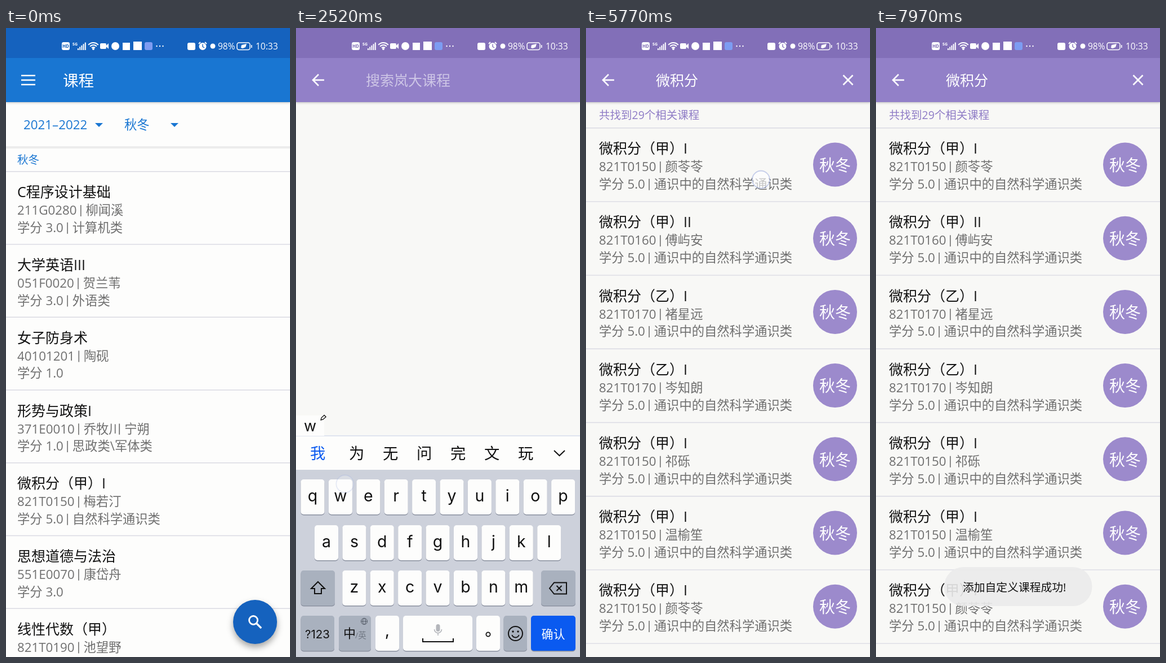
Recreate the animation shown at these times as an HTML page with a canvas. Size 504 px wide and 1112 px high, loop 8000 ms.

```html
<!DOCTYPE html>
<html lang="zh-CN">
<head>
<meta charset="utf-8">
<title>课程搜索</title>
<style>
html, body { margin: 0; width: 100%; height: 100%; overflow: hidden; }
canvas { display: block; }
</style>
</head>
<body>
<canvas id="stage" width="504" height="1112"></canvas>
<script>
const W = 504, H = 1112, LOOP = 8000;
const c = document.getElementById('stage').getContext('2d');
const FONT = "'Open Sans','Noto Sans CJK SC','Noto Sans CJK',sans-serif";
const KEY_FONT = "Inter,'Noto Sans CJK SC',sans-serif";
const INK = '#111', GRAY = '#6f6f6f', RULE = '#dadae3', PAPER = '#fdfdfc', WHITE = '#fff';
const BLUE = { bar: '#1976d2', status: '#1562be', fab: '#1562be' };
const PURPLE = { bar: '#9280c8', status: '#826fb8', fab: '#6d58a8' };
const ACCENT = '#0a5af0';

// ---------- drawing helpers ----------
const clamp = v => Math.max(0, Math.min(1, v));
const ease = (t, start, length) => 1 - (1 - clamp((t - start) / length)) ** 3;

function rect(x, y, w, h, color, r = 0) {
  c.fillStyle = color;
  c.beginPath();
  c.roundRect(x, y, w, h, r);
  c.fill();
}
function frame(x, y, w, h, r, color = INK, width = 2) {
  c.strokeStyle = color;
  c.lineWidth = width;
  c.beginPath();
  c.roundRect(x, y, w, h, r);
  c.stroke();
}
function disc(x, y, r, color) {
  c.fillStyle = color;
  c.beginPath();
  c.arc(x, y, r, 0, 7);
  c.fill();
}
function arc(x, y, r, color = INK, width = 2, from = 0, to = Math.PI * 2) {
  c.strokeStyle = color;
  c.lineWidth = width;
  c.beginPath();
  c.arc(x, y, r, from, to);
  c.stroke();
}
// points: x, y, x, y ...
function trace(points) {
  c.beginPath();
  for (let i = 0; i < points.length; i += 2) c.lineTo(points[i], points[i + 1]);
}
function line(points, color = INK, width = 2, closed = false) {
  trace(points);
  if (closed) c.closePath();
  c.strokeStyle = color;
  c.lineWidth = width;
  c.stroke();
}
function poly(points, color) {
  trace(points);
  c.fillStyle = color;
  c.fill();
}
function cross(x, y, r, color, width) {
  line([x - r, y - r, x + r, y + r], color, width);
  line([x - r, y + r, x + r, y - r], color, width);
}
// y is the visual middle of the text; returns the right edge
function text(s, x, y, size, color = INK, align = 'left', weight = 400, font = FONT) {
  c.font = `${weight} ${size}px ${font}`;
  c.textAlign = align;
  c.fillStyle = color;
  c.fillText(s, x, y + size * .37);
  return x + c.measureText(s).width;
}
const keyText = (s, x, y, size, align = 'center') => text(s, x, y, size, INK, align, 400, KEY_FONT);
const rule = (y, x = 0) => rect(x, y - .5, W - 2 * x, 1.4, RULE);

function shadowed(blur, dy, color, draw) {
  c.save();
  c.shadowBlur = blur;
  c.shadowOffsetY = dy;
  c.shadowColor = color;
  draw();
  c.restore();
}

// ---------- status bar ----------
function statusIcons(tint) {
  rect(99, 25, 14, 14, WHITE, 3);
  text('HD', 106, 32, 8, tint, 'center', 700);
  text('5G', 118, 28, 7, WHITE, 'left', 700);
  for (let i = 0; i < 5; i++) rect(127 + i * 3.2, 36 - i * 2.6, 2, 3 + i * 2.6, WHITE);
  for (const r of [4, 8, 12]) arc(155, 38, r, WHITE, 2, -2.4, -.75);
  disc(155, 37, 2, WHITE);
  rect(167, 27, 11, 10, WHITE, 2);
  poly([177, 32, 182, 27, 182, 37], WHITE);
  disc(194, 32, 7, WHITE);
  rect(207, 26, 13, 13, WHITE);
  rect(226, 24, 15, 15, WHITE);
  rect(246, 25, 14, 14, '#7d9cf2', 3);
  for (const x of [267.5, 273, 278.5]) disc(x, 32, 1.2, WHITE);

  rect(322, 26, 14, 13, WHITE, 3);
  disc(349, 32.5, 6.5, WHITE);
  line([349, 28.5, 349, 33, 352, 35], tint, 1.4);
  line([342, 28, 345, 25], WHITE);
  line([353, 25, 356, 28], WHITE);
  disc(367, 32, 4.5, WHITE);
  text('98%', 376, 32.5, 15.5, WHITE);
  frame(410, 26, 23, 12.5, 3.5, WHITE, 1.5);
  rect(435, 30, 1.6, 5, WHITE);
  poly([417, 35, 418, 30, 427, 28, 425, 34, 420, 36], WHITE);
  text('10:33', 443, 32.5, 15.5, WHITE);
}

// ---------- page parts ----------
function page(theme, background) {
  rect(0, 0, W, H, background);
  shadowed(4, 1, 'rgba(0,0,0,.25)', () => rect(0, 53, W, 78, theme.bar));
  rect(0, 0, W, 53, theme.status);
}
function backArrow() {
  line([50, 92, 30, 92], WHITE, 2.6);
  line([40, 82, 30, 92, 40, 102], WHITE, 2.6);
}
function fab(color) {
  shadowed(12, 6, 'rgba(0,0,0,.35)', () => disc(442, 1050, 39, color));
}
function pair(left, right, x, y) {
  const end = text(left, x, y, 22.3, GRAY);
  if (!right) return;
  rect(end + 6.5, y - 9, 1.6, 20, GRAY);
  text(right, end + 16, y, 22.3, GRAY);
}
function course(x, top, [title, code, teacher, credit, kind]) {
  text(title, x, top + 36.5, 25);
  pair(code, teacher, x, top + 68.5);
  pair('学分 ' + credit, kind, x, top + 99.2);
}

const MINE = [
  ['C程序设计基础', '211G0280', '柳闻溪', '3.0', '计算机类'],
  ['大学英语III', '051F0020', '贺兰苇', '3.0', '外语类'],
  ['女子防身术', '40101201', '陶砚', '1.0'],
  ['形势与政策I', '371E0010', '乔牧川 宁朔', '1.0', '思政类\\军体类'],
  ['微积分（甲）I', '821T0150', '梅若汀', '5.0', '自然科学通识类'],
  ['思想道德与法治', '551E0070', '康岱舟', '3.0'],
  ['线性代数（甲）', '821T0190', '池望野', '3.0'],
];
const FOUND = [
  ['甲）I', 150, '颜苓苓'], ['甲）II', 160, '傅屿安'], ['乙）I', 170, '褚星远'], ['乙）I', 170, '岑知朗'],
  ['甲）I', 150, '祁砾'], ['甲）I', 150, '温榆笙'], ['甲）I', 150, '颜苓苓'], ['甲）I', 150, '祁砾'],
].map(([name, n, teacher]) => ['微积分（' + name, '821T0' + n, teacher, '5.0', '通识中的自然科学通识类']);

function homePage() {
  page(BLUE, PAPER);
  for (const y of [84, 92, 100]) rect(27, y - 1.2, 25, 2.5, WHITE);
  text('课程', 101, 93, 27.6, WHITE, 'left', 500);
  text('2021–2022', 31, 171, 22.3, BLUE.bar);
  text('秋冬', 210, 171, 22.3, BLUE.bar);
  for (const x of [165, 299]) poly([x - 7, 168, x + 7, 168, x, 175], BLUE.bar);
  rect(0, 209, W, 4, '#ececec');
  text('秋冬', 20, 233, 19.5, BLUE.bar);
  MINE.forEach((row, i) => {
    const top = 253.5 + i * 128.75;
    rule(top);
    course(20, top, row);
  });
  fab(BLUE.fab);
  arc(439, 1047, 7.5, WHITE, 2.8);
  line([444, 1052, 453, 1061], WHITE, 3.2);
}

function searchPage(t) {
  page(PURPLE, '#f8f8f6');
  backArrow();
  if (t < PICKED) text('搜索岚大课程', 124, 93, 25, 'rgba(255,255,255,.55)');
  else {
    text('微积分', 124, 93, 25, WHITE);
    cross(465, 92, 8.5, WHITE, 2.6);
  }
  if (t < RESULTS) return;
  text('共找到29个相关课程', 23, 154, 19.5, '#8f7cc6');
  FOUND.forEach((row, i) => {
    const top = 176.5 + i * 130.2;
    rule(top);
    course(23, top, row);
    disc(442, top + 65, 39, '#9c8acc');
    text('秋冬', 442, top + 66, 28, WHITE, 'center');
  });
}

function detailPage() {
  page(PURPLE, PAPER);
  backArrow();
  text('课程详情', 101, 93, 27.8, WHITE, 'left', 500);
  text('微积分（甲）I', 21, 186, 25, INK, 'left', 700);
  text('821T0150', 21, 232, 22.3, GRAY);
  text('通识中的自然科学通识类', 21, 262.5, 22.3, GRAY);
  text('教师', 21, 344.5, 25);
  text('颜苓苓', 483, 344.5, 25, GRAY, 'right');
  text('2021–2022 秋冬', 21, 428, 25);
  ['周二第1,2节', '周四第3,4,5节', '周三第9节'].forEach((slot, i) => {
    const top = 466.5 + i * 107.4;
    rule(top, 21);
    text(slot, 21, top + 40, 22.3, GRAY);
    text('砚禾坡东3–201(录播.6)', 21, top + 70.5, 22.3, GRAY);
  });
  text('学分 5.0', 21, 833.5, 25);
  for (const y of [299, 382.5, 789, 872]) rule(y);
  fab(PURPLE.fab);
  rect(432, 1048.6, 20, 2.8, WHITE);
  rect(440.6, 1040, 2.8, 20, WHITE);
}

// ---------- keyboard ----------
const ROWS = [['qwertyuiop', 8.5, 798], ['asdfghjkl', 33, 879], ['zxcvbnm', 82.3, 959]];
const KEYS = {};
for (const [letters, x, y] of ROWS) [...letters].forEach((k, i) => KEYS[k] = [x + i * 49.4, y]);

const TYPED = 'weijifen';
const PRESSES = [2340, 2590, 2800, 3000, 3160, 3330, 3460, 3570];
const HOLD = 80;
const PICKED = 4050, RESULTS = 4900;
const STEPS = [
  ['w', '我 为 无 问 完 文 玩'],
  ['we', '我 为 无 问 完 文 玩'],
  ['wei', '为 位 未 喂 微 围 味'],
  ["wei'j", '围巾 危机 胃镜 未接 味精'],
  ["wei'ji", '危机 未及 微机 围棋 违纪'],
  ["wei'ji'f", '微积分 危机 未及 违纪'],
  ["wei'ji'fe", '微积分 危机 未及 违纪'],
  ["wei'ji'fen", '微积分 危机 未及 违纪'],
];

function key(x, y, w, color = PAPER) {
  rect(x, y + 1.5, w, 62, '#8b91a0', 5);
  rect(x, y, w, 62, color, 5);
}

function topBar(t, step) {
  rect(0, 721, W, 60, PAPER);
  rect(0, 720.5, W, 1, '#c6cfe8');
  if (step) {
    let x = 25;
    step[1].split(' ').forEach((word, i) => {
      if (x + word.length * 27 > 440) return;
      text(word, x, 752, 27.3, i ? INK : ACCENT);
      x += word.length * 27 + (i ? 33 : 42);
    });
    line([458, 747, 467.5, 756, 477, 747]);
    c.font = `27px ${KEY_FONT}`;
    rect(0, 685, c.measureText(step[0]).width + 28, 36, PAPER);
    const end = keyText(step[0], 14, 703, 27, 'left');
    line([end + 8, 693, end + 9, 689, end + 14, 684.5, end + 17, 687.5, end + 12, 692], INK, 1.3, true);
  } else if (t > PICKED) {
    text('难', 25, 752, 27, ACCENT);
    [[',', 98], ['?', 217], ['!', 275], ['…', 342], ['~', 395]].forEach(([s, x]) => keyText(s, x, 752, 26));
    arc(159, 762, 3.6, INK, 1.8);
    rect(433, 735, 1, 34, '#e2e2e6');
    arc(467.5, 751, 11.5);
    cross(467.5, 751, 4.5, INK, 2);
  } else {
    for (const x of [31, 44.5]) for (const y of [740.5, 754]) frame(x, y, 10, 10, 3);
    rect(78.5, 735, 1, 34, '#d0d0d4');
    rect(424, 735, 1, 34, '#ededf0');
    frame(447.5, 740.5, 27, 22, 4);
    line([454, 748, 461, 755, 468, 748]);
  }
}

function keyPopup(letter) {
  const [x, y] = KEYS[letter], r = x + 42;
  shadowed(5, 1, 'rgba(60,70,110,.35)', () => {
    c.fillStyle = PAPER;
    c.beginPath();
    c.moveTo(x - 11, y - 82);
    c.arcTo(x - 11, y - 88, x, y - 88, 6);
    c.arcTo(r + 11, y - 88, r + 11, y, 6);
    c.lineTo(r + 11, y - 16);
    c.quadraticCurveTo(r + 10, y - 6, r, y + 2);
    c.lineTo(r, y + 62);
    c.lineTo(x, y + 62);
    c.lineTo(x, y + 2);
    c.quadraticCurveTo(x - 10, y - 6, x - 11, y - 16);
    c.fill();
  });
  keyText(letter, x + 21, y - 50, 39);
}

function keyboard(t, drop) {
  c.save();
  c.translate(0, drop);
  const done = PRESSES.filter(p => t >= p + HOLD).length;
  const step = t < PICKED && STEPS[done - 1];
  const DIM = '#a9b1be';
  rect(0, 781, W, 340, '#cdd1db');
  topBar(t, step);

  for (const k in KEYS) {
    const [x, y] = KEYS[k];
    key(x, y, 42);
    keyText(k, x + 21, y + 28, 28.5);
  }
  key(8.5, 959, 60.5, DIM);
  line([39, 979, 51, 991, 45, 991, 45, 1000, 33, 1000, 33, 991, 27, 991], INK, 2, true);
  key(435, 959, 61, DIM);
  line([450, 990.5, 458, 980.5, 480, 980.5, 480, 1000.5, 458, 1000.5], INK, 2, true);
  cross(467, 990.5, 4.5, INK, 2);

  key(8.5, 1039, 59.5, DIM);
  keyText('?123', 38, 1071, 20.5);
  key(76, 1039, 57, DIM);
  text('中', 84, 1070, 22);
  text('/英', 105, 1074, 14.5, '#737a86');
  arc(121, 1049, 5.5, '#555c68', 1);
  c.beginPath();
  c.ellipse(121, 1049, 2.5, 5.5, 0, 0, 7);
  c.stroke();
  line([115.5, 1049, 126.5, 1049], '#555c68', 1);
  key(141, 1039, 42);
  keyText(',', 162, 1064, 29);
  key(190, 1039, 123);
  rect(248.5, 1054, 7, 13, '#b4b6bb', 3.5);
  arc(252, 1063, 6.5, '#b4b6bb', 1.6, 0, Math.PI);
  line([252, 1069, 252, 1074], '#b4b6bb', 1.6);
  line([225, 1079, 225, 1085, 279, 1085, 279, 1079]);
  key(320, 1039, 42);
  arc(341, 1072, 3.6, INK, 1.8);
  key(368.5, 1039, 41.5, DIM);
  arc(389.5, 1070.5, 12.5);
  disc(385, 1067, 1.7, INK);
  disc(394, 1067, 1.7, INK);
  arc(389.5, 1071, 6.5, INK, 1.8, .3, 2.84);
  key(417, 1039, 79, ACCENT);
  text(step ? '确认' : '搜索', 456.5, 1071, 21, WHITE, 'center');

  PRESSES.forEach((p, i) => { if (t >= p && t < p + HOLD) keyPopup(TYPED[i]); });
  c.restore();
}

// ---------- overlays ----------
const ADD_TAP = 6830;
const TAPS = [
  [1190, 434, 1044, 90], [3950, 54, 756, 90], [4490, 440, 1086, 90],
  [5660, 310.5, 268, 100], [ADD_TAP, 434.5, 1040, 110],
  ...PRESSES.map((p, i) => {
    const [x, y] = KEYS[TYPED[i]];
    return [p, x + 29, y + 8, HOLD];
  }),
];

function taps(t) {
  for (const [down, x, y, hold] of TAPS) {
    const alpha = t < down ? 0 : 1 - clamp((t - down - hold) / 170);
    if (!alpha) continue;
    c.globalAlpha = alpha;
    disc(x, y, 15.5, down === ADD_TAP ? 'rgba(255,255,255,.4)' : 'rgba(255,255,255,.65)');
    arc(x, y, 15.5, 'rgba(150,165,220,.55)', 1.8);
    c.globalAlpha = 1;
  }
}

function toast(t) {
  const alpha = clamp((t - 6900) / 110);
  if (!alpha) return;
  c.globalAlpha = alpha;
  rect(121, 953, 262.5, 69, 'rgba(236,236,235,.9)', 34);
  text('添加自定义课程成功!', 154, 988.5, 19.8);
  c.globalAlpha = 1;
}

// ---------- scene ----------
// p = 0 shows only the lower page, p = 1 only the upper one
function stack(lower, upper, p) {
  if (p < 1) {
    c.save();
    c.translate(-W * .3 * p, 0);
    lower();
    c.restore();
    if (p > 0) rect(0, 0, W, H, `rgba(0,0,0,${.15 * p})`);
  }
  if (p > 0) {
    c.save();
    c.translate(W * (1 - p), 0);
    upper();
    c.restore();
  }
}

function draw(t) {
  const search = () => searchPage(t);
  const opened = ease(t, 1320, 350);
  if (opened < 1) stack(homePage, search, opened);
  else stack(search, detailPage, ease(t, 5840, 560) - ease(t, 7120, 350));
  statusIcons(opened > .5 ? PURPLE.status : BLUE.status);
  const drop = 391 * (1 - ease(t, 1500, 330) + ease(t, 4640, 280));
  if (drop < 391) keyboard(t, drop);
  toast(t);
  taps(t);
}

function tick(now) {
  draw(now % LOOP);
  requestAnimationFrame(tick);
}
draw(0);
requestAnimationFrame(tick);
</script>
</body>
</html>
```
